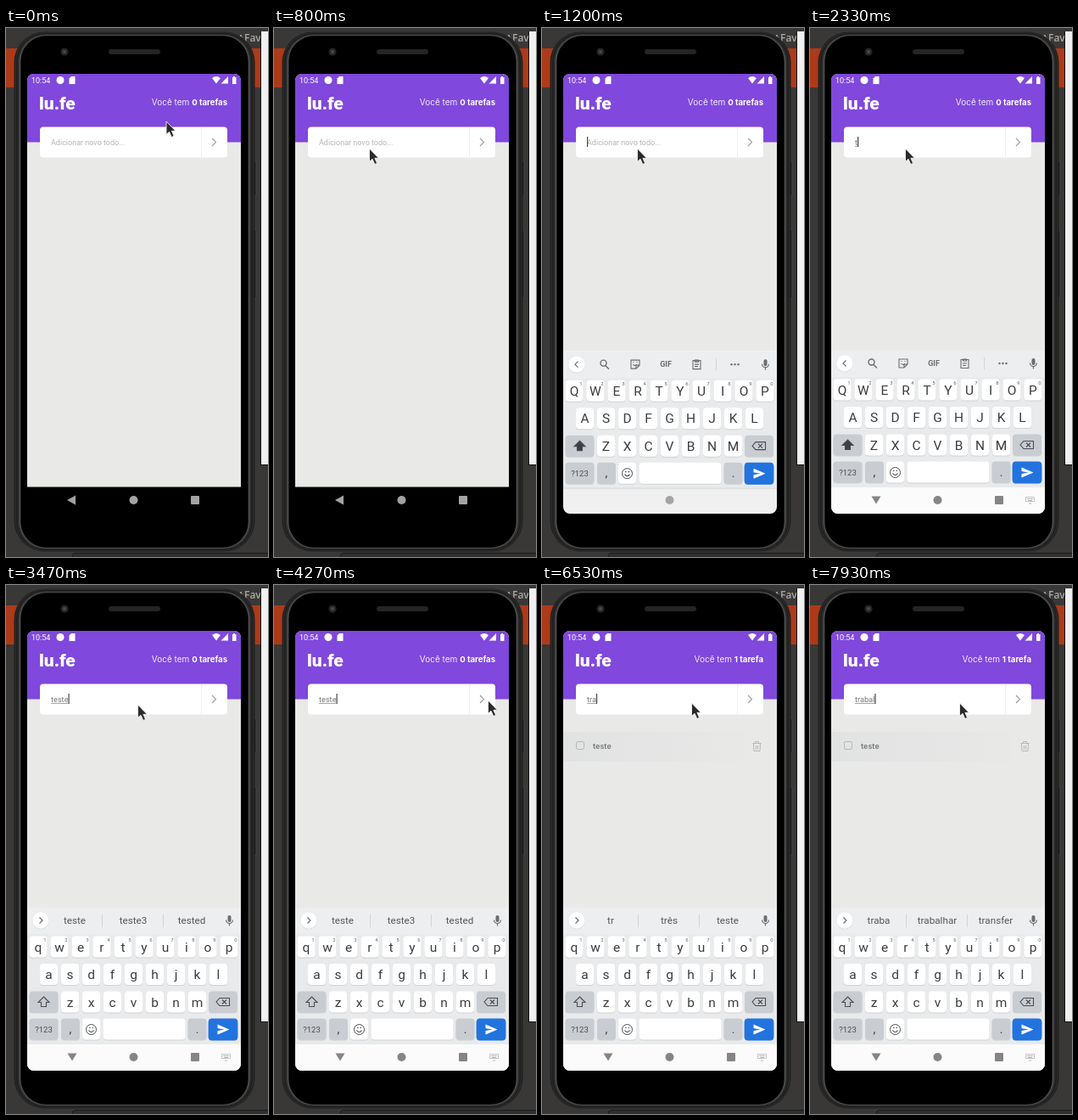
Recreate the animation shown at these times as an HTML page with a canvas. Size 309x623 px, loop 8000 ms.

```html
<!DOCTYPE html>
<html lang="pt-BR">
<head>
<meta charset="utf-8">
<style>
html, body { margin: 0; width: 100%; height: 100%; overflow: hidden; background: #393837; }
canvas { display: block; }
</style>
</head>
<body>
<canvas id="stage" width="309" height="623"></canvas>
<script>
const ctx = document.getElementById('stage').getContext('2d');
const LOOP = 8000;

// Step timelines: [start ms, value]
const typed = [[0, ''], [2330, 't'], [2530, 'te'], [2670, 'tes'], [2870, 'test'], [3070, 'teste'],
  [4600, ''], [6000, 't'], [6270, 'tr'], [6470, 'tra'], [6670, 'trab'], [7200, 'traba'], [7930, 'trabal']];
const caretOn = [[0, 0], [930, 1], [1470, 0], [1800, 1], [3600, 0], [4070, 1], [5270, 0], [5670, 1]];
const suggestions = [[0, ''], [2400, 't te tem'], [2670, 'te tem teste'], [3000, 'test teste tested'],
  [3200, 'teste teste3 tested'], [4600, ''], [6070, 't te teste'], [6400, 'tr três teste'],
  [6730, 'trab trabalho trabalhar'], [7470, 'traba trabalhar transfer']];
// Pointer path: [ms, x, y]
const pointer = [[0, 189, 110], [70, 189, 110], [800, 112.5, 142], [3400, 112.5, 142], [3470, 155.5, 141],
  [4070, 252.5, 136], [4670, 252.5, 136], [5200, 176.5, 139], [LOOP, 176.5, 139]];

const valueAt = (list, t) => list.filter(s => s[0] <= t).pop()[1];

function pointerAt(t) {
  const i = pointer.findIndex(p => p[0] > t);
  const [a, b] = [pointer[i - 1], pointer[i]];
  const p = (t - a[0]) / (b[0] - a[0]);
  const e = p * p * (3 - 2 * p);
  return [a[1] + (b[1] - a[1]) * e, a[2] + (b[2] - a[2]) * e];
}

function box(x, y, w, h, r, fill, stroke) {
  ctx.beginPath();
  ctx.roundRect(x, y, w, h, r);
  if (fill) { ctx.fillStyle = fill; ctx.fill(); }
  if (stroke) { ctx.strokeStyle = stroke; ctx.lineWidth = 1; ctx.stroke(); }
}

function dot(x, y, r, fill) { box(x - r, y - r, 2 * r, 2 * r, r, fill); }

function shape(d, fill, stroke, width = 1) {
  const path = new Path2D(d);
  if (fill) { ctx.fillStyle = fill; ctx.fill(path); }
  if (stroke) { ctx.strokeStyle = stroke; ctx.lineWidth = width; ctx.stroke(path); }
}

function text(str, x, y, font, color, align = 'left') {
  ctx.font = font + ', sans-serif';
  ctx.fillStyle = color;
  ctx.textAlign = align;
  ctx.fillText(str, x, y);
  return ctx.measureText(str).width;
}

function drawDesktop() {
  box(0, 0, 309, 623, 0, '#393837');
  box(0, 24, 309, 46, 0, '#ad3a19');
  shape('M270 8l3 3M277 8l3 8h-7z', null, '#aaa');
  text('Fav', 281, 16, '600 12px Open Sans', '#aaa8a5');
  box(300, 4, 10, 511, 0, '#111');
  box(301, 4, 8, 510, 0, '#f0f0f0');
  box(78, 618.5, 240, 10, 4, '#302f2e', '#1c1c1c');
}

function drawPhone() {
  box(292, 157, 3, 41, 1, '#1c1c1c', '#484848');
  box(292, 238, 3, 80, 1, '#1c1c1c', '#484848');
  // Bevelled rim, from the outside in
  ['#202020', '#2c2c2c', '#1c1c1c', '#2a2a2a', '#3a3a3a', '#505050', '#000'].forEach((gray, i) =>
    box(9.5 + 1.3 * i, 4.5 + 0.8 * i, 284 - 2.6 * i, 612 - 1.6 * i, 36 - i, gray));
  box(121, 25, 61, 6, 3, '#242424');
  dot(69, 28, 4.5, '#262626');
  dot(69, 28, 2, '#4a4a4a');
}

function drawHeader(count) {
  box(25, 54, 252, 80.5, 0, '#8048dc');
  text('10:54', 30, 65, '9px Roboto', '#fff');
  dot(64, 61.5, 4.5, '#fff');
  shape('M77 57h4.500v9h-7v-6.500z', '#fff');
  shape('M243 59q5-4 10 0l-5 6.500zM262 57v8.500h-8.500zM267 58h1v-1h2v1h1.500v8h-4.500z', '#fff');
  text('lu.fe', 39, 96, '900 21px Roboto', '#fff');
  const bold = count ? '1 tarefa' : '0 tarefas';
  const w = text(bold, 261, 91, 'bold 9.6px Inter', '#fff', 'right');
  text('Você tem ', 261 - w, 91, '10px Inter', '#f1eafc', 'right');
}

function drawInput(t) {
  box(40, 116.5, 221, 36, 4, '#fff');
  box(230, 117, 1, 35, 0, '#efefef');
  shape('M243 130l4.500 4.500-4.500 4.500', null, '#a0a0a0', 1.2);
  const value = valueAt(typed, t);
  let w = 0;
  if (value) {
    w = text(value, 53, 138, '9.2px Roboto', '#777');
    box(53, 139, w, 0.8, 0, '#888');
  } else {
    text('Adicionar novo todo...', 53, 138, '9px Roboto', '#b4b4b4');
  }
  if (valueAt(caretOn, t)) box(53 + w, 128, 1.2, 12, 0, '#444');
}

function drawTask() {
  const g = ctx.createLinearGradient(25, 0, 237, 0);
  g.addColorStop(0, '#e1e2e2');
  g.addColorStop(1, '#e8e8e7');
  box(25, 173, 212, 35, 0, g);
  box(40.5, 184.5, 9, 9, 2, null, '#b5b5b5');
  text('teste', 60, 193, '600 9px Inter', '#777');
  shape('M248.500 186.500h10M251.500 186v-1.500h4v1.500M249.500 187l.5 8.500h7l.5-8.500M252.500 189v4.500M254.500 189v4.500', null, '#b8b8b8');
}

function key(cx, cy, w, fill = '#fff', shadow = '#cfd2d4') {
  box(cx - w / 2, cy - 11.5, w, 25, 4, shadow);
  box(cx - w / 2, cy - 12.5, w, 25, 4, fill);
}

function drawStrip(words) {
  const ink = '#6a6e72';
  dot(41, 395.5, 10, '#d9dbdd');
  dot(41, 395, 9.7, '#fff');
  if (words) {
    shape('M39.500 391.500l3.500 3.500-3.500 3.500', null, ink, 1.2);
    words.split(' ').forEach((word, i) => text(word, 81 + 69 * i, 399, '11.7px Roboto', '#55585b', 'center'));
    box(113, 388, 1, 15, 0, '#d2d4d6');
    box(185, 388, 1, 15, 0, '#d2d4d6');
  } else {
    shape('M42.500 391.500l-3.500 3.500 3.500 3.500', null, ink, 1.2);
    shape('M76 393.500a3.500 3.500 0 1 0-7 0a3.500 3.500 0 1 0 7 0M75 396.500l4 4', null, ink, 1.4);
    shape('M105 390h10v6l-4 4h-6zM111 400v-4h4M107.500 395q2 3 4 0M107.500 392.500h1M111.500 392.500h1', null, ink, 1.1);
    text('GIF', 146, 398, 'bold 9px Roboto', ink, 'center');
    shape('M178 390.500h9v10h-9zM180.500 390h4v2h-4zM180 395h5M180 397.500h4', null, ink, 1.1);
    box(205, 388, 1, 14, 0, '#d2d4d6');
    [223.5, 227.5, 231.5].forEach(x => dot(x, 395, 1.2, ink));
  }
  box(261.5, 389, 4, 8, 2, ink);
  shape('M259.500 394.500a4 4 0 0 0 8 0M263.500 398.500v3', null, ink, 1.2);
}

function drawKeys(caps) {
  const ink = '#3a3c3e', gray = '#c9cdd1', blue = '#2373de';
  const letters = (row, x0, cy) => [...row].forEach((ch, i) => {
    const x = x0 + 25 * i;
    key(x, cy, 21);
    text(caps ? ch.toUpperCase() : ch, x, cy + 5.5, '15.5px Roboto', ink, 'center');
  });
  letters('qwertyuiop', 38, 426);
  for (let i = 0; i < 10; i++) text((i + 1) % 10, 46 + 25 * i, 420, '6px Roboto', '#5f6368', 'center');
  letters('asdfghjkl', 50.5, 458.5);
  key(44.5, 491, 34, gray);
  letters('zxcvbnm', 75.5, 491);
  shape('M44.500 485l6.500 6.500h-3.500v5h-6v-5h-3.500z', caps ? '#3c4043' : null, '#4a4e51', 1.1);
  key(256, 491, 34, gray);
  shape('M252 486.500h11.500v9h-11.500l-4-4.500zM255 488.500l5 5M260 488.500l-5 5', null, '#4a4e51', 1.1);

  key(44.5, 523, 34, gray);
  text('?123', 44.5, 527, '9.5px Roboto', '#4a4e51', 'center');
  key(76, 523, 22, gray);
  text(',', 76, 528, '14px Roboto', ink, 'center');
  key(100.5, 523, 21);
  box(94.5, 517.5, 12, 12, 6, null, '#4a4e51');
  shape('M97.500 524.500q3 4 6 0M98 521.500h1.500M101.500 521.500h1.500', null, '#4a4e51', 1.2);
  key(163, 523, 97);
  key(225.5, 523, 22, gray);
  text('.', 225.5, 528, '14px Roboto', ink, 'center');
  key(256, 523, 34.5, blue, blue);
  shape('M249.500 517.500l14 6-14 6v-4.500l8-1.500-8-1.500z', '#fff');
}

function drawKeyboard(t, words) {
  const left = Math.max(0, (1226 - t) / 294);
  box(25, 380.5, 252, 192, 0, '#f8f9f8');
  ctx.save();
  ctx.translate(0, 161 * left * left);
  box(25, 380, 252, 162, 0, '#e8eaec');
  box(25, 380, 252, 31, 0, '#eceeef');
  drawStrip(words);
  drawKeys(!words);
  ctx.restore();
  if (left) {
    box(25, 541, 252, 31, 0, `rgba(60,60,60,${left / 2})`);
    dot(150.5, 556, 5, 'rgba(90,90,90,.5)');
    return;
  }
  box(25, 541, 252, 31, 0, '#fbfbfb');
  const icon = '#858585';
  shape('M72.500 551.500h11l-5.500 9z', icon);
  dot(150.5, 556, 5, icon);
  box(218, 551, 10, 10, 1, icon);
  box(254.5, 552.5, 10, 5, 0, null, '#c4c4c4');
  shape('M256 554.500h7M257 556.500h5M258 560h3', null, '#b4b4b4');
}

function drawNav() {
  shape('M72 556l10-5.500v11z', '#a3a3a3');
  dot(150.5, 556, 5, '#a3a3a3');
  box(218, 551, 10, 10, 1, '#a3a3a3');
}

function drawPointer(t) {
  const [x, y] = pointerAt(t);
  ctx.save();
  ctx.translate(x, y);
  shape('M0 0v15.500l3.500-3.200 2.800 6.200 2.800-1.200-2.700-6h4.600z', '#2a2a2a', '#f4f4f4', 0.9);
  ctx.restore();
}

function draw(t) {
  const done = t >= 4600;
  drawDesktop();
  drawPhone();
  ctx.save();
  ctx.beginPath();
  ctx.roundRect(25, 54, 252, 518, 8);
  ctx.clip();
  box(25, 54, 252, 486.5, 0, '#e9e9e8');
  drawHeader(done);
  drawInput(t);
  if (done) drawTask();
  if (t < 930) drawNav();
  else drawKeyboard(t, valueAt(suggestions, t));
  ctx.restore();
  drawPointer(t);
}

function tick() {
  draw(performance.now() % LOOP);
  requestAnimationFrame(tick);
}
tick();
</script>
</body>
</html>
```
